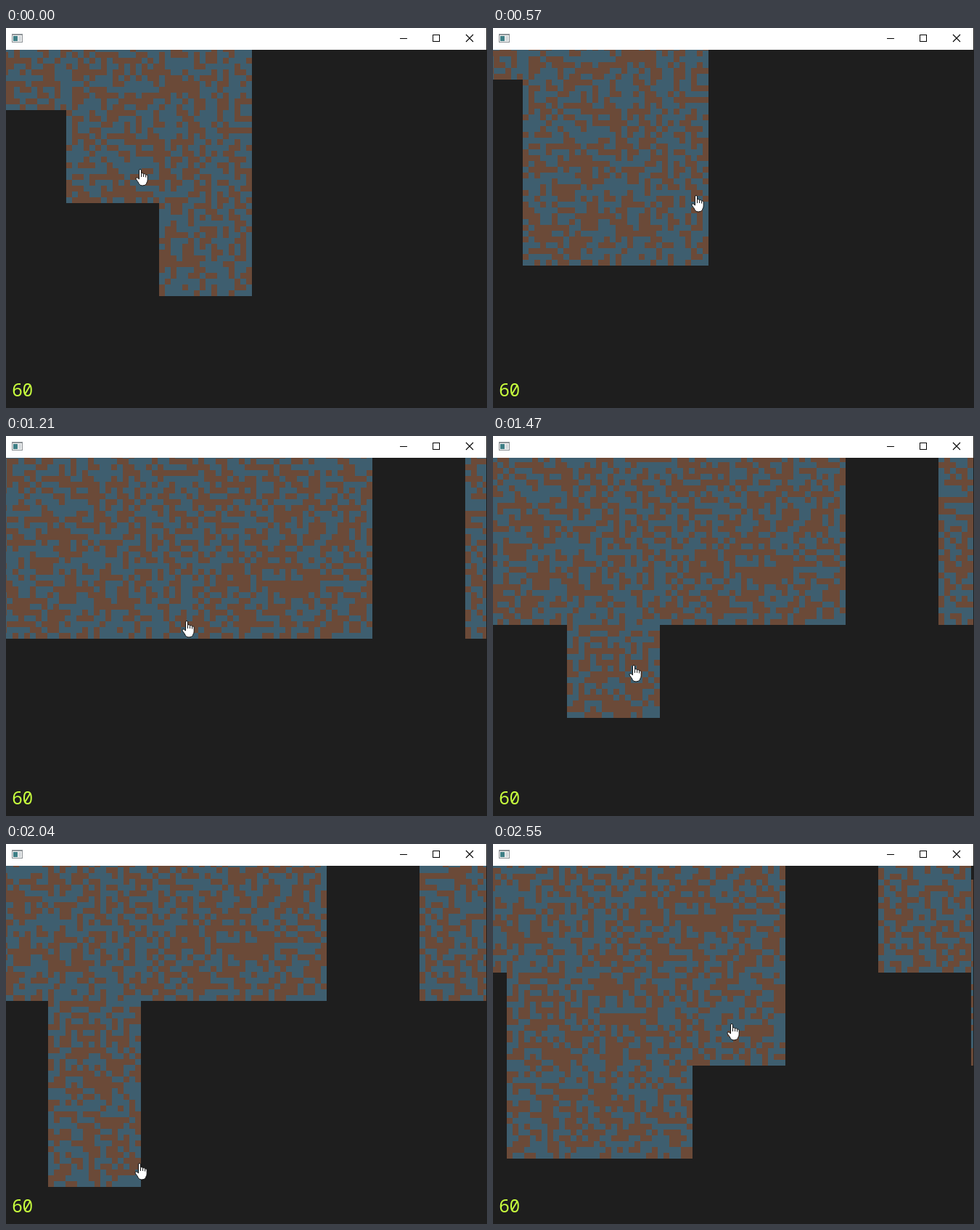
Animation of 663 by 523 pixels, one loop 2570 ms. Source, as an HTML page with a canvas:

```html
<!DOCTYPE html>
<html lang="en">
<head>
<meta charset="utf-8">
<title>Chunk explorer</title>
<style>
  html, body { margin: 0; width: 100%; height: 100%; overflow: hidden; background: #1e1e1e; }
  canvas, svg { position: absolute; left: 0; top: 0; display: block; }
  .fps { font: 300 24.5px "Noto Sans Mono", "DejaVu Sans Mono", monospace; letter-spacing: -.6px; fill: #c8ff3e; }
</style>
</head>
<body>
<canvas id="world" width="663" height="523"></canvas>
<svg width="663" height="523" viewBox="0 0 663 523">
  <path d="M0 0H662V30H0Z" fill="#fff"/>
  <g shape-rendering="crispEdges">
    <path d="M8 8H23V20H8Z" fill="#8c9296"/>
    <path d="M9 10H22V19H9Z" fill="#f4f4f4"/>
    <path d="M10 11H16V18H10Z" fill="#3f7f86"/>
    <path d="M17 11H21V18H17Z" fill="#d5dadd"/>
    <path d="M543 14H553V15H543Z"/>
    <path d="M588.5 9.5H597.5V18.5H588.5Z" fill="none" stroke="#000"/>
  </g>
  <path d="M634 9L644 19M644 9L634 19" stroke="#000" stroke-width="1.1"/>
  <text class="fps" x="8.3" y="507">60</text>
  <path id="hand" fill="#fff" stroke="#111" stroke-linejoin="round"
    d="M-1.5 2Q-1.5 .5 0 .5T1.5 2V6.5Q2 5.5 3.2 5.7T4.6 7.4Q5.2 6.4 6.4 6.8T7.6 8.4Q8.4 7.6 9.4 8.2T10.2 10V15Q10.2 17.5 8.6 19.5V20.5Q6.5 23 3 23T-1.6 20.5Q-3 17.5-5.4 14.8Q-6.8 12.6-5.4 11.9T-1.5 14Z M1.5 6.5V11M4.6 7.4V11M7.6 8.4V11.5"/>
</svg>
<script>
const LOOP = 2570, TICK = 19.9, SPEED = 1.5;
const CELL = 8, SIDE = 16, CHUNK = CELL * SIDE;
const START = { x: 83, y: 113 }, TOP = 30, RIGHT = 662;
const BLUE = '#3e5e6f', BROWN = '#6b4a38', BACK = '#1e1e1e';

// Pointer in world space: [tick, x, y]
const route = [
  [0, 102, 81], [10, 100, 150], [28, 239, 159], [38, 335, 122],
  [48, 460, 119], [54, 445, 160], [61, 238, 240], [73, 220, 311],
  [90, 225, 448], [114, 293, 473], [121, 330, 375], [128, 438, 326]
];

const ctx = document.getElementById('world').getContext('2d');
const hand = document.getElementById('hand');
const scrollAt = n => Math.floor(n * SPEED);

function slope(i, axis) {
  const a = route[Math.max(0, i - 1)], b = route[Math.min(route.length - 1, i + 1)];
  return (b[axis] - a[axis]) / (b[0] - a[0]);
}

// Cubic Hermite through the route
function pointer(n) {
  let i = 0;
  while (i < route.length - 2 && n >= route[i + 1][0]) i++;
  const a = route[i], b = route[i + 1], d = b[0] - a[0];
  const u = Math.min(1, (n - a[0]) / d), v = 1 - u;
  return [1, 2].map(k => Math.round(
    v * v * (1 + 2 * u) * a[k] + u * u * (1 + 2 * v) * b[k] +
    u * v * d * (v * slope(i, k) - u * slope(i + 1, k))
  ));
}

// Already open: a staircase on the left and two columns on the right
function isOpen(col, row) {
  return (row <= col && col <= 1) || (col === 5 && row < 2) || (col === 6 && row > 0);
}

// Every chunk the pointer enters opens at that tick
function explore() {
  const found = new Map();
  for (let row = -1; row < 3; row++)
    for (let col = -1; col < 7; col++)
      if (isOpen(col, row)) found.set(`${col},${row}`, 0);
  for (let n = 0; n * TICK < LOOP; n++) {
    const key = pointer(n).map(v => Math.floor(v / CHUNK)).join();
    if (!found.has(key)) found.set(key, n);
  }
  return [...found].map(([key, tick]) => [...key.split(',').map(Number), tick]);
}

function isBlue(x, y) {
  let h = Math.imul(x + 101, 374761393) ^ Math.imul(y + 57, 668265263);
  h = Math.imul(h ^ h >>> 15, 2246822519);
  h = Math.imul(h ^ h >>> 13, 3266489917);
  return (h ^ h >>> 16) < 0;
}

function drawChunk(col, row, scroll) {
  const left = START.x + col * CHUNK - scroll, top = START.y + row * CHUNK - scroll;
  if (left >= RIGHT || left + CHUNK <= 0 || top + CHUNK <= TOP) return;
  ctx.fillStyle = BROWN;
  ctx.fillRect(left, top, CHUNK, CHUNK);
  ctx.fillStyle = BLUE;
  for (let y = 0; y < SIDE; y++)
    for (let x = 0; x < SIDE; x++)
      if (isBlue(col * SIDE + x, row * SIDE + y))
        ctx.fillRect(left + x * CELL, top + y * CELL, CELL, CELL);
}

function draw(n) {
  const scroll = scrollAt(n), [x, y] = pointer(n);
  ctx.fillStyle = BACK;
  ctx.fillRect(0, 0, 663, 523);
  for (const [col, row, tick] of chunks)
    if (n >= tick) drawChunk(col, row, scroll);
  ctx.fillStyle = BACK;
  ctx.fillRect(RIGHT, 0, 1, 523);
  hand.setAttribute('transform', `translate(${START.x + x - scroll} ${START.y + y - scroll})`);
}

const chunks = explore();
let last = -1;
function frame() {
  const n = Math.floor(performance.now() % LOOP / TICK);
  if (n !== last) draw(n);
  last = n;
  requestAnimationFrame(frame);
}
frame();
</script>
</body>
</html>
```
